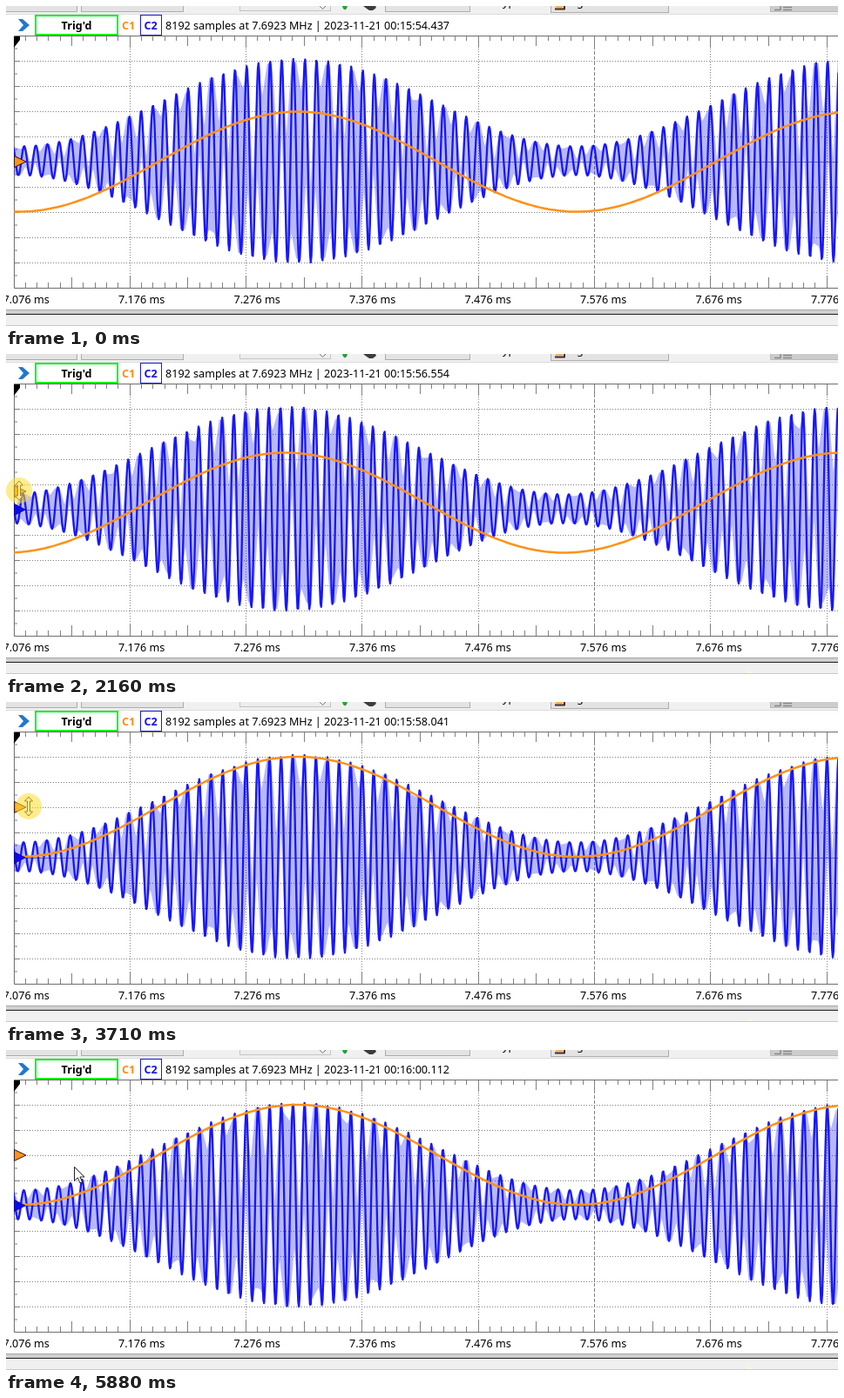
Animation of 955x368 px, one loop 5950 ms. Source, as an HTML page:

```html
<!DOCTYPE html>
<html lang="en">
<head>
<meta charset="utf-8">
<title>Oscilloscope</title>
<style>
  html, body { margin: 0; width: 100%; height: 100%; overflow: hidden; background: #fff; }
  svg { display: block; position: absolute; left: 0; top: 0; }
  text { font: 12.6px "Noto Sans", "Open Sans", sans-serif; fill: #000; white-space: pre; }
  .b { font-weight: 700; }
  .mid { text-anchor: middle; }
  .line { fill: none; stroke-linejoin: round; }
</style>
</head>
<body>
<svg width="955" height="368" viewBox="0 0 955 368">
  <defs><clipPath id="plot"><rect x="9" y="34" width="946" height="290"/></clipPath></defs>

  <!-- toolbar edge -->
  <rect width="955" height="9" fill="#f0f0f0"/>
  <path d="M0 9.5H955" stroke="#dcdcdc"/>
  <g fill="#e3e3e3" stroke="#adadad">
    <rect x="-3.5" y="-9.5" width="85" height="16"/>
    <rect x="86.5" y="-9.5" width="117" height="16"/>
    <rect x="268.5" y="-9.5" width="104" height="15" fill="#ededed" stroke="#c4c4c4"/>
    <rect x="435.5" y="-9.5" width="97" height="16"/>
    <rect x="625.5" y="-9.5" width="135" height="17"/>
    <rect x="877.5" y="-9.5" width="90" height="16" fill="#cccccc" stroke="#bcbcbc"/>
  </g>
  <path d="M360 0l3.500 3.500 3.500-3.500" class="line" stroke="#777"/>
  <path d="M386 0h6l-1 3-2 1.500-2-1.500z" fill="#2f9e2f"/>
  <path d="M410 0h14l1 2-4 3h-4l-3-2z" fill="#3c3c3c"/>
  <text x="570" y="0">yp</text>
  <path d="M630 3.500h11V0" class="line" stroke="#4a2a1a" stroke-width="2"/>
  <path d="M631 1h8" stroke="#f2b25a" stroke-width="2"/>
  <text x="655" y="0">g</text>
  <path d="M882 4.500h7V0M892 4.500h10M892 1.500h10" class="line" stroke="#888" stroke-width="1.500"/>

  <!-- status row -->
  <path d="M14 15h5l8 7-8 7h-5l6-7z" fill="#1f78d1"/>
  <rect x="34" y="11" width="94" height="22" fill="#fff" stroke="#00f016" stroke-width="2"/>
  <text class="b mid" x="81" y="27">Trig'd</text>
  <text class="b mid" x="140.500" y="27" style="fill:#ff8c14">C1</text>
  <rect x="154.500" y="10.500" width="24" height="23" fill="#fff" stroke="#1818f0"/>
  <text class="b mid" x="166" y="27" style="fill:#1414e6">C2</text>
  <text id="info" x="183" y="27"></text>

  <g id="grid"></g>
  <g clip-path="url(#plot)">
    <path id="band" fill="#0000ff" fill-opacity=".28"/>
    <path id="carrier" class="line" stroke="#1717fb" stroke-width="2.300"/>
    <path id="signal" class="line" stroke="#ff9217" stroke-width="2.500"/>
  </g>
  <path d="M9 35h7v4l-7 9z"/>
  <path d="M9.500 172.500L22 179l-12.500 6.500z" fill="#0a0af0" stroke="#0a0a90"/>
  <path id="level" d="M9.500 -6.500L23 0l-13.500 6.500z" fill="#ff9217" stroke="#2b1a30"/>

  <!-- axis labels and bottom edge -->
  <g id="labels"></g>
  <rect y="349" width="955" height="5" fill="#cfcfcf"/>
  <rect y="355" width="955" height="13" fill="#f0f0f0"/>
  <path d="M0 349.500H955" stroke="#a8a8a8"/>
  <path d="M0 354.500H955" stroke="#1c1c1c"/>
  <path d="M0 367.500H955" stroke="#c8c8c8"/>
  <path id="fleck" d="M850 367l2.500-3 5 3z" fill="#fff9d8"/>

  <path id="arrow" d="M.5 .5v16l3.800-3.600 2.600 6 2.600-1.100-2.600-5.800h5.100z" fill="#fff" stroke="#222"/>
  <g id="grab">
    <path d="M0-11l4.500 5h-3V6h3L0 11l-4.500-5h3V-6h-3z" fill="#fff" stroke="#3a2a10"/>
    <circle r="15" fill="#ffdc30" fill-opacity=".55"/>
  </g>
</svg>

<script>
const LOOP = 5950, STEP = 70, LAST = 84;
const LEFT = 9, RIGHT = 955, TOP = 34, DIV = 400 / 3;
const MOD = 640, PEAK = 335;
const CARRIER = MOD / 48, CREST = 328.7, LAG = 1.15;
const BIN = 5.55;

// rows: time, then values
const CLOCK = [[0, 54437], [700, 55169], [2160, 56554], [2930, 57291], [3710, 58051], [4970, 59251], [5880, 60122]];
const MARKER = [[1950, 179], [2160, 158], [2540, 121]];
const OFFSET = [[2020, 179], [2160, 171], [2600, 121.5], [2930, 121.5], [3200, 120.5]];
const POINTER = [[280, 853, 372], [630, 180, 160], [700, 165, 153], [1000, 150, 158], [1600, 24, 176],
  [1900, 15, 179], [2160, 15, 157], [2540, 26, 120], [4250, 26, 120], [4700, 78, 134]];

const $ = id => document.getElementById(id);
const show = (el, on) => el.setAttribute("visibility", on ? "visible" : "hidden");
const move = (el, x, y) => el.setAttribute("transform", `translate(${x} ${y})`);

function at(rows, t) {
  if (t <= rows[0][0]) return rows[0].slice(1);
  for (let i = 1; i < rows.length; i++) {
    const a = rows[i - 1], b = rows[i];
    if (t <= b[0]) {
      const k = (t - a[0]) / (b[0] - a[0]);
      return a.slice(1).map((v, j) => v + (b[j + 1] - v) * k);
    }
  }
  return rows[rows.length - 1].slice(1);
}

function noise(n) {
  const v = Math.sin(n * 12.9898) * 43758.5453;
  return v - Math.floor(v);
}

function trace(step, y, from = LEFT - step) {
  const pts = [];
  for (let x = from; x <= RIGHT + step; x += step) pts.push(x.toFixed(1) + " " + y(x).toFixed(1));
  return pts;
}

function buildGrid() {
  const line = (d, dash, color) =>
    `<path d="${d}" fill="none" stroke="${color || "#808080"}"${dash ? ` stroke-dasharray="${dash}"` : ""}/>`;
  const column = i => Math.floor(LEFT - .1 + i * DIV / 10) + .5;
  let out = "", ticks = "", labels = "";
  for (let i = 1; i < 10; i++) {
    const y = TOP + i * 29 + .5;
    if (i !== 5) out += line(`M9 ${y}H955`, "1 2");
    ticks += `M9 ${y}h7`;
  }
  for (let i = 0; i < 10; i++) ticks += `M9 ${TOP + i * 29 + 15}h4`;
  for (let i = 1; i <= 70; i++) {
    const x = column(i);
    const h = i % 10 === 0 ? 14 : i % 5 === 0 ? 12 : 6;
    if (i % 10 === 0) out += line(`M${x} 34V324`, i === 50 ? "4 2" : "1 2");
    ticks += `M${x} 34v${h}M${x} 324v${-h}`;
  }
  out += line("M9 179.5H955") + line(ticks) + line("M955 34.5H9.5V324.5H955", "", "#6e6e6e");
  for (let i = 0; i < 8; i++)
    labels += `<text x="${-3.5 + i * 132.5}" y="342">${(7.076 + i / 10).toFixed(3)} ms</text>`;
  $("grid").innerHTML = out;
  $("labels").innerHTML = labels;
}

function drawWaves(n, t) {
  const shift = t >= 2080 && t < 2480 ? -14 : 0;
  const jitter = n ? -.4 - .6 * noise(n) : 0;
  const mod = x => Math.cos(2 * Math.PI * (x - PEAK - shift) / MOD);
  const wave = x => {
    const m = mod(x);
    return 178 - (67 + 50.3 * m) * Math.cos(2 * Math.PI * (x - CREST - LAG * m - shift - jitter) / CARRIER);
  };
  const [mid] = at(OFFSET, t);
  $("carrier").setAttribute("d", "M" + trace(.8, wave).join("L"));
  $("signal").setAttribute("d", "M" + trace(5, x => mid - 57.5 * mod(x)).join("L"));

  // extremes of the carrier in coarse bins
  const from = LEFT - BIN * (1 + noise(n + 40));
  const samples = x => [-.5, -.25, 0, .25, .5].map(k => wave(x + k * BIN));
  const upper = trace(BIN, x => Math.min(...samples(x)), from);
  const lower = trace(BIN, x => Math.max(...samples(x)), from).reverse();
  $("band").setAttribute("d", "M" + upper.concat(lower).join("L") + "Z");
}

function drawInfo(t) {
  const ms = Math.round(at(CLOCK, t)[0]);
  const pad = (v, w) => String(v).padStart(w, "0");
  const sec = Math.floor(ms / 1000);
  $("info").textContent = "8192 samples at 7.6923 MHz | 2023-11-21 00:" +
    `${15 + Math.floor(sec / 60)}:${pad(sec % 60, 2)}.${pad(ms % 1000, 3)}`;
}

function drawPointer(t) {
  const [x, y] = at(POINTER, t);
  const held = t >= 1900 && t < 4250;
  show($("arrow"), t > 280 && !held);
  show($("grab"), held);
  move($("arrow"), x, y);
  move($("grab"), x, y);
  move($("level"), 0, at(MARKER, t)[0]);
  show($("fleck"), t > 280);
}

let shown = -1;
function render(t) {
  const lead = t >= 1880 ? 10 : 0;
  const n = Math.min(LAST, Math.floor((t + lead) / STEP));
  if (n === shown) return;
  shown = n;
  const time = n * STEP - lead;
  drawWaves(n, time);
  drawInfo(time);
  drawPointer(time);
}

buildGrid();
const start = performance.now();
function tick() {
  render((performance.now() - start) % LOOP);
  requestAnimationFrame(tick);
}
tick();
</script>
</body>
</html>
```
